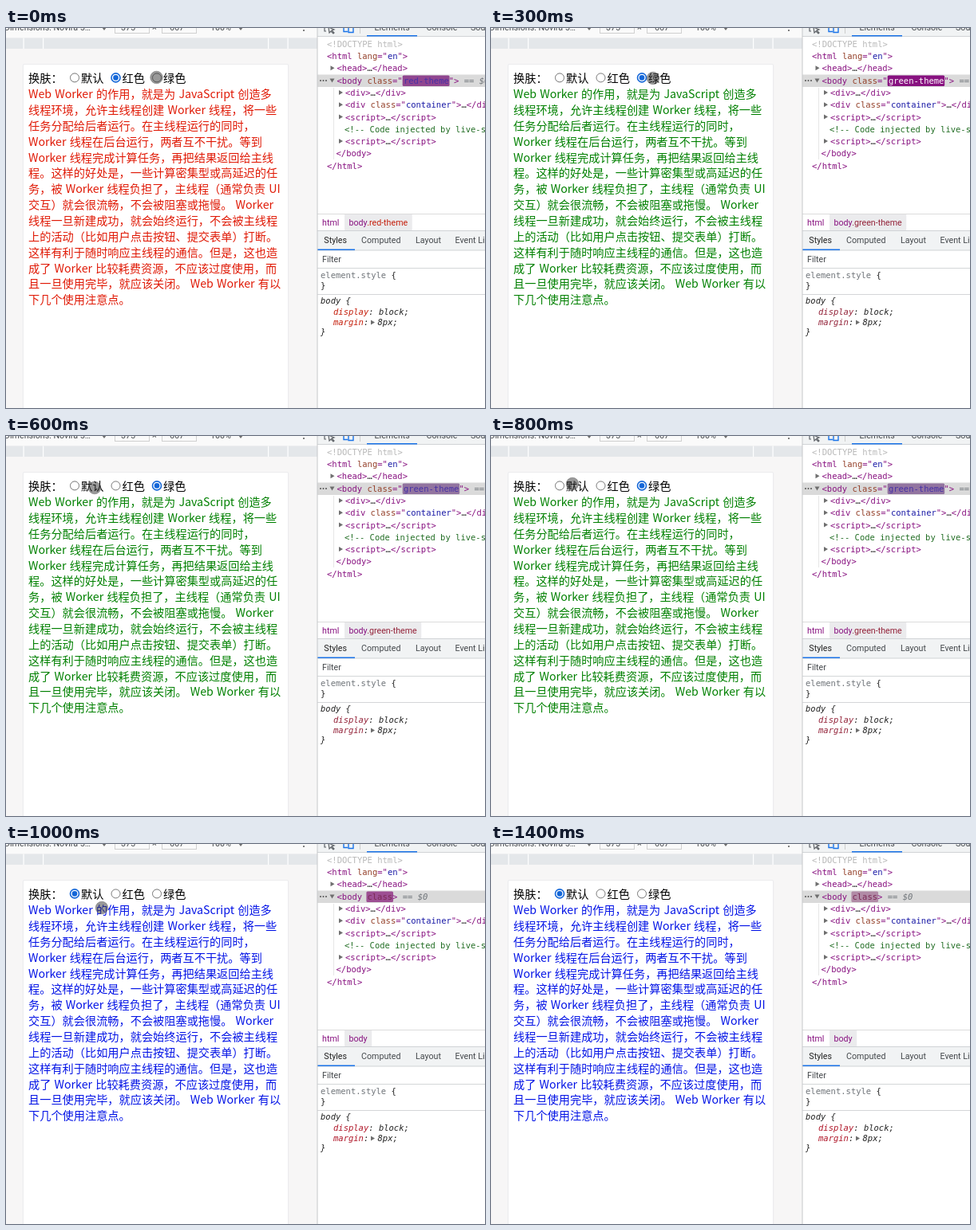
These frames come from a looping animation (600x477 px, 1.5 s). An HTML page:

```html
<!DOCTYPE html>
<html lang="zh">
<head>
<meta charset="utf-8">
<title>Theme switch</title>
<style>
  html, body { margin: 0; width: 100%; height: 100%; overflow: hidden; background: #fff; }
  svg { display: block; }
  text { white-space: pre; }
  .page { font: 14.2px "Noto Sans CJK SC", "Noto Sans CJK", sans-serif; word-spacing: 1px; }
  .ui { font: 10.7px Roboto, sans-serif; fill: #45494d; }
  .code { font: 10.5px "DejaVu Sans Mono", monospace; fill: #222; }
  .it { font-style: italic; }
  .tag { fill: #881280; }
  .attr { fill: #94402a; }
  .val { fill: #1a1aa6; }
  .note { fill: #236e25; }
  .prop, .theme { fill: var(--accent); }
  .dim { fill: #b8b8b8; }
  .grey { fill: #70757a; }
</style>
</head>
<body>
<script>
const NS = "http://www.w3.org/2000/svg";
const LOOP = 1500, STEP = 100;

function add(parent, name, attrs = {}, content = "") {
  const el = document.createElementNS(NS, name);
  for (const key in attrs) el.setAttribute(key, attrs[key]);
  el.textContent = content;
  parent.append(el);
  return el;
}

const svg = add(document.body, "svg", { width: 600, height: 477, viewBox: "0 0 600 477" });
const rect = (x, y, width, height, fill, more) => add(svg, "rect", { x, y, width, height, fill, ...more });
const path = (d, more) => add(svg, "path", { d, fill: "none", ...more });
const label = (x, y, s, cls, more) => add(svg, "text", { x, y, class: cls, ...more }, s);

// Runs are [class, text] pairs set one after another.
function runs(x, y, parts, cls = "code") {
  const t = label(x, y, "", cls);
  return parts.map(([c, s]) => add(t, "tspan", { class: c }, s));
}

const arrow = (x, y, open) =>
  path(open ? `M${x - 3} ${y - 2}h6l-3 5z` : `M${x - 2} ${y - 3}v6l5-3z`, { fill: "#6e6e6e" });

// Device preview
rect(0, 0, 390, 477, "#f7f6f6");
rect(0, 0, 390, 12, "#fafafa");
rect(0, 12.5, 390, 13.5, "#e4e7ea");
for (const x of [21.5, 46, 328, 352.5]) rect(x, 12.5, 1.2, 13.5, "#fff");
label(-2, 3.4, "Dimensions: Novira 5…", "ui");
label(153, 3.4, "375", "ui", { "text-anchor": "middle" });
label(183, 3.4, "×", "ui");
label(214, 3.4, "667", "ui", { "text-anchor": "middle" });
label(256, 3.4, "100%", "ui");
for (const x of [136.5, 195.5]) rect(x, -9, 43, 15.5, "none", { stroke: "#d0d0d0" });
for (const x of [123, 294]) path(`M${x - 3} -1h6l-3 4z`, { fill: "#6e6e6e" });
for (const y of [-1, 3]) add(svg, "circle", { cx: 373, cy: y, r: 1, fill: "#555" });
rect(20.8, 45, 333.4, 440, "#ececee", { rx: 2 });
rect(22, 46, 331, 440, "#fff", { rx: 1 });

label(28, 68, "换肤：", "page");
const radios = [["默认", 86], ["红色", 137.5], ["绿色", 189]].map(([name, cx]) => {
  label(cx + 8, 68, name, "page");
  return {
    ring: add(svg, "circle", { cx, cy: 62.4, r: 5.5, fill: "#fff" }),
    dot: add(svg, "circle", { cx, cy: 62.4, r: 3.3, fill: "#1467d8" })
  };
});

const article = add(svg, "g", { class: "page" });
[
  "Web Worker 的作用，就是为 JavaScript 创造多",
  "线程环境，允许主线程创建 Worker 线程，将一些",
  "任务分配给后者运行。在主线程运行的同时，",
  "Worker 线程在后台运行，两者互不干扰。等到",
  "Worker 线程完成计算任务，再把结果返回给主线",
  "程。这样的好处是，一些计算密集型或高延迟的任",
  "务，被 Worker 线程负担了，主线程（通常负责 UI",
  "交互）就会很流畅，不会被阻塞或拖慢。 Worker",
  "线程一旦新建成功，就会始终运行，不会被主线程",
  "上的活动（比如用户点击按钮、提交表单）打断。",
  "这样有利于随时响应主线程的通信。但是，这也造",
  "成了 Worker 比较耗费资源，不应该过度使用，而",
  "且一旦使用完毕，就应该关闭。 Web Worker 有以",
  "下几个使用注意点。"
].forEach((s, i) => add(article, "text", { x: 28, y: 88.2 + i * 19.85 }, s));

// Inspector tabs
rect(390, 0, 210, 477, "#fff");
rect(390, 0, 210, 10, "#f1f3f4");
rect(390, 10, 210, 1, "#d0d3d6");
path("M399 -2V4h2M404 -1l7 3-3 1 3 3-1 1-3-3-2 2z", { stroke: "#5f6368", "stroke-width": 1.2 });
path("M423 -3V4.5h5M429 -1h6V5.5h-6z", { stroke: "#1a73e8", "stroke-width": 1.4 });
rect(443, 0, 1, 7, "#ccc");
label(461.5, 3.4, "Elements", "ui");
label(526.5, 3.4, "Console", "ui");
label(582, 3.4, "Sources", "ui");
rect(452, 9, 63, 1.5, "#1a73e8");

// Element tree
const rowY = i => 23.7 + i * 15.3;
const script = [["tag", "<script>"], ["", "…"], ["tag", "<\/script>"]];
rect(390, 58.5, 210, 15.5, "#dadada");
rect(410, 75, 1, 90, "#e6e6e6");
const flash = rect(0, 59.5, 0, 13.5, "#881280", { rx: 1.5 });
label(402, rowY(0), "<!DOCTYPE html>", "code dim");
runs(402, rowY(1), [["tag", "<html "], ["attr", "lang"], ["tag", '="'], ["val", "en"], ["tag", '">']]);
runs(414.5, rowY(2), [["tag", "<head>"], ["", "…"], ["tag", "</head>"]]);
const [, attr, quote, value, close] = runs(414.5, rowY(3),
  [["tag", "<body "], ["attr", "class"], ["tag", '="'], ["val", ""], ["tag", '">'], ["grey it", " == $0"]]);
value.setAttribute("dx", 1.2);
runs(425, rowY(4), [["tag", "<div>"], ["", "…"], ["tag", "</div>"]]);
runs(425, rowY(5), [["tag", "<div "], ["attr", "class"], ["tag", '="'], ["val", "container"],
  ["tag", '">'], ["", "…"], ["tag", "</div>"]]);
runs(425, rowY(6), script);
label(424, rowY(7), "<!-- Code injected by live-server -->", "code note");
runs(425, rowY(8), script);
label(413.5, rowY(9), "</body>", "code tag");
label(402, rowY(10), "</html>", "code tag");
for (const x of [394, 397.5, 401]) add(svg, "circle", { cx: x, cy: 66, r: 1, fill: "#555" });
arrow(408.5, rowY(2) - 4);
arrow(408.5, rowY(3) - 4, true);
for (const i of [4, 5, 6, 8]) arrow(419, rowY(i) - 4);

// Breadcrumb
rect(390, 233, 210, 1, "#dcdcdc");
const crumbBox = rect(424, 234, 0, 20, "#ebebed");
label(396, 247.5, "html", "ui", { style: "fill:#881280" });
const [, crumb] = runs(429.5, 247.5, [["tag", "body"], ["theme", ""]], "ui");

// Styles pane
rect(390, 254, 210, 25, "#f1f3f4");
rect(390, 254, 210, 1, "#d0d3d6");
rect(390, 278.5, 210, 1, "#d0d3d6");
rect(390, 277.5, 47, 1.5, "#1a73e8");
label(398.3, 270, "Styles", "ui", { style: "fill:#222" });
label(445, 270, "Computed", "ui");
label(513, 270, "Layout", "ui");
label(562.5, 270, "Event Listeners", "ui");
label(396, 294, "Filter", "ui");
rect(390, 301, 210, 1, "#d4d6d8");
runs(394, 313.5, [["grey", "element.style"], ["", " {"]]);
label(394, 327, "}", "code");
rect(390, 334, 210, 1, "#d4d6d8");
label(394, 346, "body {", "code it");
runs(410, 360, [["prop", "display"], ["", ": block;"]], "code it");
runs(410, 373, [["prop", "margin"], ["", ":"]], "code it");
arrow(459, 369.5);
label(465.5, 373, "8px;", "code it");
label(394, 385, "}", "code it");
rect(389.5, 0, 1, 477, "#c6c8ca");

// Pointers
const touch = add(svg, "circle", { r: 7.8, fill: "#333", "fill-opacity": .5, stroke: "#555", "stroke-opacity": .4 });
const beam = path("M-3.5 -7.5q3 0 3.5 2q.5 -2 3.5 -2M0 -5.5V5.5M-3.5 7.5q3 0 3.5 -2q.5 2 3.5 2M-1.5 1.5h3",
  { stroke: "#222", "stroke-width": 1.2 });

const themes = [
  { from: 0, name: "red-theme", color: "#e01a06", accent: "#c5200d", radio: 1, rest: [154, 134, 164], fade: [.55, .2, 0] },
  { from: 3, name: "green-theme", color: "#008000", accent: "#94243a", radio: 2, rest: [146, 116, 160], fade: [1, .5, .2, 0] },
  { from: 9, name: "", color: "#0414e6", accent: "#b0182a", radio: 0, rest: [177, 139, 166], fade: [1, .5, .2, 0] }
];
const hot = [136, 18, 128];
const pointer = [
  [188.5, 62], [197, 62], [203, 63], [203, 63], [190, 64], [150, 65], [111, 65], [106, 62],
  [102, 60], [102, 60], [120, 80], [290, 245], [448, 389], [462, 440], null
];
const CH = 6.32;

function draw(n) {
  const theme = themes.findLast(t => n >= t.from);
  const { name, fade, rest } = theme;
  const heat = fade[Math.min(n - theme.from, fade.length - 1)];
  const lit = heat > .8 ? "#fff" : "";

  svg.style.setProperty("--accent", theme.accent);
  article.setAttribute("fill", theme.color);
  radios.forEach(({ ring, dot }, i) => {
    const on = i === theme.radio;
    ring.setAttribute("stroke", on ? "#1467d8" : "#767676");
    ring.setAttribute("stroke-width", on ? 1.6 : 1);
    dot.setAttribute("visibility", on ? "visible" : "hidden");
  });

  quote.textContent = name && '="';
  value.textContent = name;
  close.textContent = name ? '">' : ">";
  value.style.fill = lit || "#4530a6";
  attr.style.fill = name ? "" : lit || "#7a2a55";
  flash.setAttribute("x", name ? 414.5 + CH * 13 : 413.5 + CH * 6);
  flash.setAttribute("width", 2 + CH * (name.length || 5));
  flash.setAttribute("fill", `rgb(${rest.map((v, i) => Math.round(v + (hot[i] - v) * heat))})`);

  crumb.textContent = name && "." + name;
  crumbBox.setAttribute("width", 11 + crumb.parentNode.getComputedTextLength());

  const at = pointer[n];
  const inPage = at && at[0] < 390;
  touch.setAttribute("visibility", inPage ? "visible" : "hidden");
  beam.setAttribute("visibility", at && !inPage ? "visible" : "hidden");
  if (at) (inPage ? touch : beam).setAttribute("transform", `translate(${at})`);
}

const start = performance.now();
let last = -1;
function tick() {
  const n = Math.floor((performance.now() - start) % LOOP / STEP);
  if (n !== last) draw(last = n);
  requestAnimationFrame(tick);
}
tick();
</script>
</body>
</html>
```
